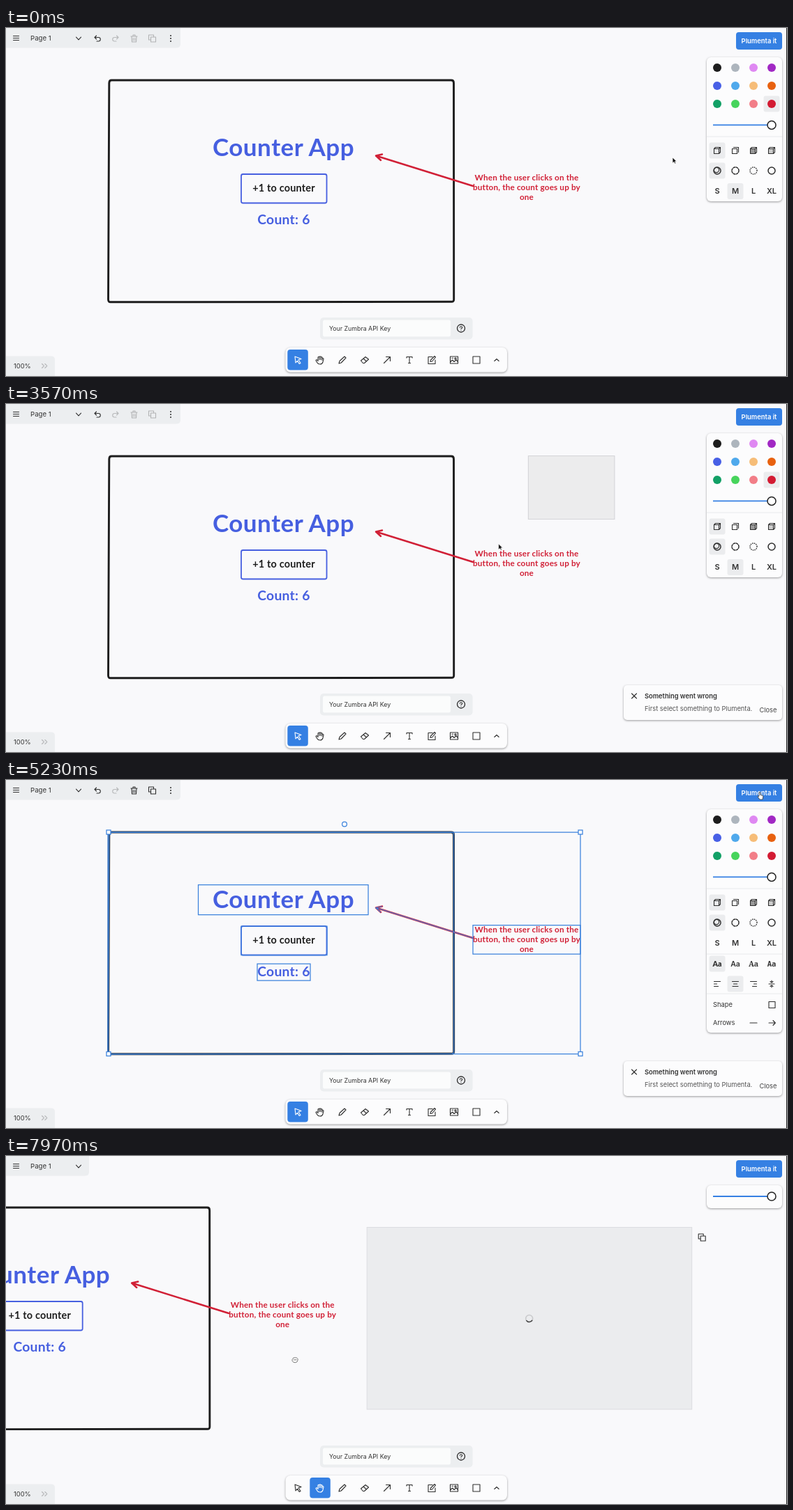
An HTML page that plays this animation: 1119 px wide and 500 px high, repeating every 8 s.

```html
<!DOCTYPE html>
<html lang="en">
<head>
<meta charset="utf-8">
<title>Whiteboard</title>
<style>
html, body { margin: 0; width: 100%; height: 100%; overflow: hidden; background: #f9f9fb; }
svg { display: block; width: 100%; height: 100%; }
text { font-family: Inter, Roboto, sans-serif; font-size: 9.3px; fill: #333; }
.draw { font-family: Lato, "Open Sans", sans-serif; font-weight: 700; letter-spacing: .015em; }
.bar { fill: #eceef0; }
.card { fill: #fcfcfd; filter: drop-shadow(0 1px 1.5px rgba(0,0,0,.38)); }
.icon { fill: none; stroke: #2e2e2e; stroke-width: 1.1; stroke-linecap: round; stroke-linejoin: round; }
.pick { fill: #ebecee; }
.rule { stroke: #e8eaec; }
.outline { fill: none; stroke: #3b82dc; stroke-width: 1.25; }
.mid { text-anchor: middle; }
</style>
</head>
<body>
<svg id="stage" viewBox="0 0 1119 500" preserveAspectRatio="none"></svg>
<script>
const LOOP = 8000;
const BLUE = '#3580e3', INK = '#1d1d1d', INDIGO = '#465fe0', RED = '#d12036';
const COLUMNS = [1019, 1045, 1071, 1097];
const COLORS = ['#1d1d1d', '#adb5bd', '#df88f2', '#a128c4', '#4860e6', '#4fa9ec',
  '#f6bd78', '#e8610f', '#12a066', '#47d45c', '#f27e88', '#d31b33'];

const rect = (x, y, w, h, r = 0, attrs = '') =>
  `<rect x="${x}" y="${y}" width="${w}" height="${h}" rx="${r}" ${attrs}/>`;
const circle = (x, y, r, attrs = '') => `<circle cx="${x}" cy="${y}" r="${r}" ${attrs}/>`;
const path = (d, attrs = '') => `<path d="${d}" ${attrs}/>`;
const text = (x, y, s, attrs = '') => `<text x="${x}" y="${y}" ${attrs}>${s}</text>`;
const icon = (x, y, d, attrs = '') =>
  `<g transform="translate(${x} ${y})" class="icon" ${attrs}>${path(d)}</g>`;
const group = (id, body, attrs = '') => `<g id="${id}" ${attrs}>${body}</g>`;
const pick = (x, y) => rect(x - 11.5, y - 11.5, 23, 23, 3, 'class="pick"');
const each = (list, fn) => list.map(fn).join('');

const SQUARE = 'M-4.5-4.5h9v9h-9z';
const COPY = 'M-2-2h7v7h-7zM-2 2h-3v-7h7v3';
const HAND = 'M-3-.5V-4q1-1.4 2 0v3.5M-1-4.5q1-1.5 2 0v4M1-4q1.1-1.2 2 .2v4M3-2.2q1.5-1 2 .5L4 3Q3 6 0 6-3 6-4 4L-6 .8q.3-1.6 1.8-.8L-3 1.5V-.5';
const CHEVRON = 'M-3.5-1.8 0 1.8 3.5-1.8';
const ARROW = 'M-4.5 0h9M1.5-3.5 4.8 0 1.5 3.5';
const FRAME = 'M151 75 638 75Q641.5 75 641.5 79L641.7 390Q641.7 393.5 638 393.3L150 393.8Q146.5 394 146.5 390L147.8 79Q148 75 151 75Z';

// Selectable shapes: bounds [left, top, right, bottom] and the outline drawn when selected.
const box = ([l, t, r, b]) => `M${l} ${t}H${r}V${b}H${l}Z`;
const SHAPES = [
  { bounds: [146, 75, 642, 393.5], outline: FRAME },
  { bounds: [275.5, 150.5, 519, 193.5] },
  { bounds: [337, 210, 460, 251.5] },
  { bounds: [360, 264, 436, 288] },
  { bounds: [530, 183, 669, 227], outline: 'M669 227 530 183.5M539 181.5 530 183.5 537 190' },
  { bounds: [669, 208.5, 823, 250] },
];

function boardMarkup() {
  const note = ['When the user clicks on the', 'button, the count goes up by', 'one'];
  return path(FRAME, `fill="none" stroke="${INK}" stroke-width="2.9"`) +
    text(397.5, 184, 'Counter App', `class="draw mid" style="font-size:35px;fill:${INDIGO}"`) +
    rect(337, 210, 122.5, 41.5, 2.5, `fill="none" stroke="${INDIGO}" stroke-width="1.8"`) +
    text(398, 235.3, '+1 to counter', `class="draw mid" style="font-size:14.4px;fill:${INK}"`) +
    text(398, 282, 'Count: 6', `class="draw mid" style="font-size:19.3px;fill:${INDIGO}"`) +
    path(SHAPES[4].outline, `fill="none" stroke="${RED}" stroke-width="2.5" stroke-linecap="round" stroke-linejoin="round"`) +
    each(note, (s, i) => text(746, 219 + i * 13.8, s, `class="draw mid" style="font-size:11.7px;fill:${RED}"`)) +
    group('preview',
      rect(867, 103.5, 465.5, 261.5, 0, 'fill="#ebecee" stroke="#dcdde1"') +
      icon(1347, 118, COPY) +
      `<g transform="translate(1099.5 234.5)" fill="none" stroke-width="1.6">` +
      circle(0, 0, 5, 'stroke="#c9cacc"') +
      group('spinner', path('M2.5-4.3A5 5 0 0 1 2.5 4.3', 'stroke="#444"')) + '</g>') +
    group('outlines', each(SHAPES, s => path(s.outline || box(s.bounds), 'class="outline"'))) +
    path('', 'id="bounds" class="outline"') +
    group('handles',
      each([[147, 75], [823, 75], [147, 393.5], [823, 393.5]], ([x, y]) => rect(x - 3, y - 3, 6, 6, 0, 'class="outline" style="fill:#fff"')) +
      circle(485, 63.5, 3.4, 'class="outline" style="fill:#fff"'));
}

function panelMarkup() {
  const fill = 'M-4.5-2.5h7v7h-7zM-2.5-4.5h7v7M-4.5-2.5l2-2M2.5 4.5l2-2M2.5-2.5l2-2';
  const fonts = ['Lato', 'Inter', '"Noto Serif"', '"Noto Sans Mono"'];
  const generic = ['sans-serif', 'sans-serif', 'serif', 'monospace'];
  const aligns = ['M-4.5-3.5h9M-4.5 0h4M-4.5 3.5h6', 'M-4.5-3.5h9M-2.5 0h5M-4 3.5h8',
    'M-4.5-3.5h9M.5 0h4M-1.5 3.5h6', 'M-4 0h8M0-5v3M-2-3.5 0-2l2-1.5M0 5V2M-2 3.5 0 2l2 1.5'];
  const dashes = ['', '2.4 1.6', '.3 2.4', ''];
  return rect(1004, 42, 108, 207, 6, 'id="panel" class="card"') +
    group('styles',
      group('single', pick(1097, 109) + pick(1045, 234.5)) +
      each(COLORS, (c, i) => circle(COLUMNS[i % 4], 57 + 26 * (i >> 2), 6, `fill="${c}"`)) +
      path('M1004 156H1112', 'class="rule"') + pick(1019, 176) + pick(1019, 205) +
      each(COLUMNS, (x, i) => rect(x - 4.5, 173.5, 7, 7, 0, `fill="${['none', 'none', '#999', '#ccc'][i]}"`) +
        icon(x, 176, i === 1 ? 'M-4.5-2.5h7v7h-7zM-2.5-4.5h7v7' : fill) +
        circle(x, 205, 5, `class="icon" stroke-dasharray="${dashes[i]}" style="stroke-width:1.5"`) +
        text(x, 238.2, ['S', 'M', 'L', 'XL'][i], 'class="mid" style="font-size:11px;font-weight:600"')) +
      circle(1018, 204, 3.6, 'class="icon"')) +
    group('mixed',
      path('M1004 250H1112M1004 307H1112', 'class="rule"') + pick(1019, 264) + pick(1045, 293) +
      each(COLUMNS, (x, i) => text(x, 268, 'Aa', `class="mid" style='font:${i ? 600 : 900} 10.5px ${fonts[i]},${generic[i]}'`) +
        icon(x, 293, aligns[i])) +
      text(1013, 326, 'Shape') + icon(1097.5, 323, SQUARE) +
      text(1013, 352, 'Arrows') + icon(1071, 349, 'M-5 0H5') + icon(1097.5, 349, ARROW)) +
    group('slider', path('M1013 139.4H1091', `stroke="${BLUE}" stroke-width="1.8"`) +
      circle(1097, 139.4, 6, 'fill="#fff" stroke="#222" stroke-width="1.5"'));
}

function chromeMarkup() {
  const trash = 'M-4.5-3h9M-3.5-3 -3 5H3L3.5-3M-1.5-3v-2h3v2M-1.2-.5V3M1.2-.5V3';
  const tools = [
    [418, 'M-4-5 5-1.5 1-.2 4 4.5 2.2 5.5-.5 1.2-3 4Z'], [450, HAND],
    [482, 'M-5 5-4 1.5 3-5 5-3-1.8 4Z'], [514, 'M-5.5 1 1-4.5 5.5-1-.5 4.5H-2.5ZM-2-2 2.5 2'],
    [546, 'M-4.5 4.5 4.5-4.5M-1.5-4.5h6v6'], [578, 'M-4-3v-1.5h8V-3M0-4.5v9M-1.5 4.5h3'],
    [610, 'M1-4.5h-6v10H5V0M-2 2.5-1.5 0 4-5.5 5.5-4 .5 2Z'],
    [642, 'M-5.5-5h11V5h-11zM-5.5 3l3-3 2.5 2.5L3 0l2.5 2.5M-3-2.8h1.5M1-3h2v2H1z'],
    [674, 'M-5-5H5V5H-5z'], [703, 'M-3.2 1.5 0-1.5 3.2 1.5'],
  ];
  return path('M0 0H250V23Q250 28.5 244 28.5H0Z', 'id="menu" class="bar"') +
    icon(14.5, 14.5, 'M-4-3h8M-4 0h8M-4 3h8') + text(35, 18.3, 'Page 1', 'style="font-size:9.6px"') + icon(104, 15, CHEVRON) +
    group('edit',
      icon(131, 15, 'M-1.5-4-4-1.5-1.5 1M-4-1.5H1.5a2.7 2.7 0 0 1 0 5.5H-1') +
      icon(157, 15, 'M1.5-4 4-1.5 1.5 1M4-1.5H-1.5a2.7 2.7 0 0 0 0 5.5H1', 'opacity=".28"') +
      group('clipboard', icon(183.5, 15, trash) + icon(209.5, 15, COPY)) +
      icon(236, 15, 'M0-4v.1M0 0v.1M0 4v.1', 'style="stroke-width:2"')) +
    rect(1046, 6, 66, 25, 4, `fill="${BLUE}"`) +
    text(1079, 21.5, 'Plumenta it', 'class="mid" style="font-size:9.4px;font-weight:600;fill:#fff"') +
    panelMarkup() +
    rect(450, 416, 218.5, 31.5, 5, 'class="bar"') + rect(454, 419.5, 183, 24, 3, 'fill="#fbfcfc"') +
    text(463, 434.6, 'Your Zumbra API Key', 'style="font-size:8.8px"') +
    circle(652, 431.5, 5.5, 'class="icon" style="stroke-width:1.3"') + icon(652, 431.5, 'M-1.7-1.2Q-1.5-2.8 0-2.8T1.7-1.2Q1.7-.3 0 .6M0 2.6v.1') +
    path('M0 471.5H65Q70 471.5 70 477V500H0Z', 'class="bar"') + text(11, 489, '100%') +
    icon(55, 485.5, 'M-3.5-3-.5 0-3.5 3M.8-3 3.8 0 .8 3', 'opacity=".28"') +
    rect(400.5, 459, 317.5, 35.5, 7, 'class="card"') +
    rect(403.3, 462, 29.5, 29.5, 4, `id="active" fill="${BLUE}"`) +
    group('tools', each(tools, ([x, d]) => icon(x, 477, d))) +
    group('toast', rect(885, 404, 227, 50, 5, 'class="card"') +
      icon(900, 419.5, 'M-3.5-3.5l7 7M3.5-3.5l-7 7') +
      text(915, 422.5, 'Something went wrong', 'style="font-weight:600"') +
      text(915, 441.3, 'First select something to Plumenta.', 'style="fill:#555"') +
      text(1079.5, 442.7, 'Close', 'style="fill:#444"'));
}

const CURSORS = {
  arrow: path('M0 0V8.2L2 6.4 3.3 9 4.7 8.4 3.5 5.8H6Z', 'fill="#111" stroke="#fff" stroke-width=".7"'),
  plain: path('M0 0V8.5L2 6.7 3.3 9.4 4.7 8.8 3.5 6H6.2Z', 'fill="#fff" stroke="#333" stroke-width=".9"'),
  point: path('M-1 5V0q1-1.4 2 0v3.5l3 .8q1 .4.8 1.6L4 10H0L-3 6q0-1.6 2-.3', 'fill="#fff" stroke="#444" stroke-width=".9"'),
  open: `<g transform="scale(.75)">${path(HAND, 'fill="#fff" stroke="#444"')}</g>`,
  grab: path('M-3.5-1.5q1-2.3 2.5-1.5 1-1 2 0 1.5-.6 2.3.8 1 .8.5 2.7Q3.3 3.8 0 3.8-3 3.8-4 1.5-4.5-.5-3.5-1.5ZM-1.5-1v1.6M0-1v1.6M1.6-1v1.6', 'fill="#fff" stroke="#666" stroke-width=".9"'),
};

document.getElementById('stage').innerHTML =
  rect(0, 0, 1119, 500, 0, 'fill="#f9f9fb"') + group('board', boardMarkup()) +
  rect(0, 0, 0, 0, 0, 'id="brush" fill="rgba(90,90,100,.085)" stroke="rgba(90,90,100,.2)"') +
  chromeMarkup() +
  group('pointer', each(Object.keys(CURSORS), k => group('cursor-' + k, CURSORS[k]))) +
  rect(1118, 0, 1, 500, 0, 'fill="#222"');

// Pointer path: time, x, y.
const TRACK = [
  [0, 955, 186], [550, 1075, 22], [900, 1078, 18], [1650, 1078, 18], [2170, 958, 450], [2500, 940, 455],
  [3250, 872, 74.5], [3300, 872, 74.5], [3520, 749, 165], [3570, 706.5, 200.5], [3900, 430, 340],
  [4150, 215, 402], [4280, 168.5, 409], [4330, 156, 411], [4420, 152, 412], [5200, 1080, 18],
  [5500, 1080, 18], [6430, 444, 494], [6700, 449, 480], [6850, 449, 480], [7350, 764, 294],
  [7440, 764, 294], [7500, 734, 295], [7670, 605, 296], [7970, 414.8, 293], [8000, 398, 292.6],
];
const GRAB = [764, 294];
const TIME = { toastIn: 1000, brush: 3300, release: 4420, preview: 5500, hand: 6720, toastOut: 6900, drag: 7440 };

const slope = (i, k) => TRACK[i + 1] && TRACK[i]
  ? (TRACK[i + 1][k] - TRACK[i][k]) / (TRACK[i + 1][0] - TRACK[i][0]) : 0;
function tangent(i, k) {
  const a = slope(i - 1, k), b = slope(i, k);
  return a * b > 0 ? 2 * a * b / (a + b) : 0;
}
// Monotone cubic, so the pointer never overshoots a rest.
function pointerAt(t) {
  let i = 0;
  while (i < TRACK.length - 2 && t >= TRACK[i + 1][0]) i++;
  const [from, to] = [TRACK[i], TRACK[i + 1]];
  const span = to[0] - from[0], u = (t - from[0]) / span, v = 1 - u;
  return [1, 2].map(k => from[k] * (1 + 2 * u) * v * v + to[k] * (3 - 2 * u) * u * u +
    span * u * v * (tangent(i, k) * v - tangent(i + 1, k) * u));
}

const $ = id => document.getElementById(id);
const show = (node, on) => { node.style.display = on ? '' : 'none'; };
const set = (node, attrs) => { for (const k in attrs) node.setAttribute(k, attrs[k]); };
const inside = ([x, y], l, t, r, b) => x >= l && x <= r && y >= t && y <= b;

function updateSelection(t, hand) {
  const brushing = t >= TIME.brush && t < TIME.release;
  const [x, y] = pointerAt(Math.min(Math.max(t - 50, TIME.brush), TIME.release));
  show($('brush'), brushing);
  set($('brush'), { x, y: 74.5, width: Math.max(0, 872 - x), height: Math.max(0, y - 74.5) });

  const selected = SHAPES.filter(({ bounds: [l, top, r] }, i) => {
    const hit = t >= TIME.brush && !hand && x < r && y > top;
    show($('outlines').children[i], hit);
    return hit;
  });
  const edge = (k, pickEdge) => pickEdge(...selected.map(s => s.bounds[k]));
  const any = selected.length > 0;
  set($('bounds'), { d: any ? box([edge(0, Math.min), edge(1, Math.min), edge(2, Math.max), edge(3, Math.max)]) : '' });
  show($('handles'), any && !brushing);
  return any;
}

function cursorKind(p, t, hand) {
  if (inside(p, 1046, 6, 1112, 31) || inside(p, 400, 459, 718, 500)) return 'point';
  if (hand) return t >= TIME.drag ? 'grab' : 'open';
  return t > TIME.toastIn && inside(p, 885, 404, 1112, 456) ? 'plain' : 'arrow';
}

function render(t) {
  const hand = t >= TIME.hand;
  const p = pointerAt(t);
  const shift = t >= TIME.drag ? [p[0] - GRAB[0], p[1] - GRAB[1]] : [0, 0];
  set($('board'), { transform: `translate(${shift})` });
  show($('preview'), t >= TIME.preview);
  set($('spinner'), { transform: `rotate(${(t - 7670) * .36 - 20})` });

  const any = updateSelection(t, hand);
  show($('styles'), !hand);
  show($('single'), !any);
  show($('mixed'), any);
  set($('panel'), { height: hand ? 33 : any ? 321 : 207 });
  set($('slider'), { transform: `translate(0 ${hand ? -81.4 : 0})` });
  show($('edit'), !hand);
  set($('clipboard'), { opacity: any ? 1 : .3 });
  const end = hand ? 119 : 250;
  set($('menu'), { d: `M0 0H${end}V23Q${end} 28.5 ${end - 6} 28.5H0Z` });

  set($('active'), { x: hand ? 435.3 : 403.3 });
  [0, 1].forEach(i => { $('tools').children[i].style.stroke = i === +hand ? '#fff' : ''; });

  const slide = Math.min(1, Math.max(0, (t - TIME.toastIn) / 200));
  show($('toast'), slide > 0 && t < TIME.toastOut + 100);
  set($('toast'), {
    transform: `translate(${240 * (1 - slide) ** 3} 0)`,
    opacity: 1 - Math.min(1, Math.max(0, (t - TIME.toastOut) / 100)),
  });

  set($('pointer'), { transform: `translate(${p})` });
  const kind = cursorKind(p, t, hand);
  for (const k in CURSORS) show($('cursor-' + k), k === kind);
}

const start = performance.now();
function tick() {
  render((performance.now() - start) % LOOP);
  requestAnimationFrame(tick);
}
tick();
</script>
</body>
</html>
```
